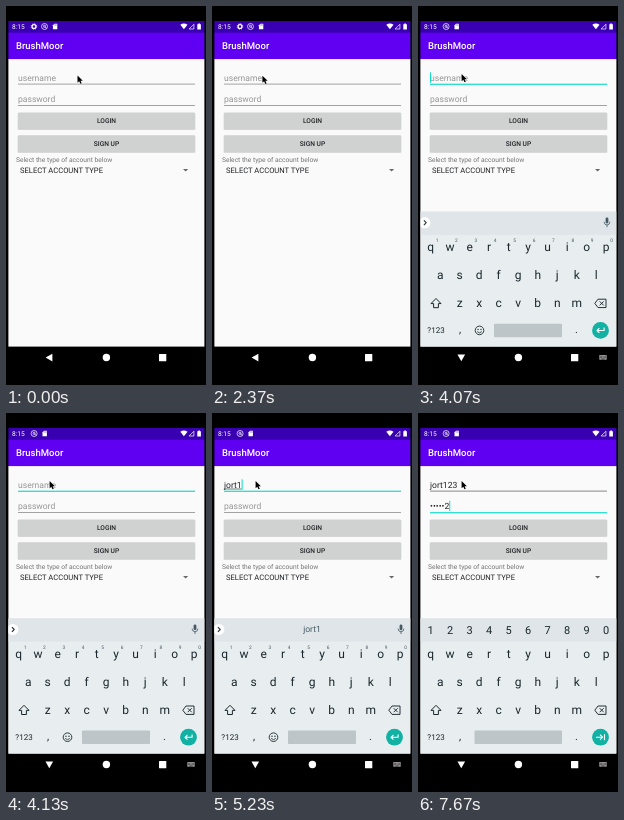
Recreate the animation shown at these times as an HTML page. Size 200 by 379 pixels, loop 8000 ms.

```html
<!DOCTYPE html>
<html lang="en">
<head>
<meta charset="utf-8">
<title>Login form</title>
<style>
  html, body { margin: 0; width: 100%; height: 100%; overflow: hidden; background: #000; }
  svg { display: block; width: 100vw; height: 100vh; }
  text { font-family: Roboto, "Noto Sans", sans-serif; text-rendering: geometricPrecision; white-space: pre; }
</style>
</head>
<body>
<svg id="stage" viewBox="0 0 200 379"></svg>
<script>
const LOOP = 8000;
const USER = 'jort123';
const TEAL = '#03dac5';
const INK = '#202124';
const KEY = '#1b272d';
const stage = document.getElementById('stage');

function el(tag, attrs, parent = stage) {
  const node = document.createElementNS('http://www.w3.org/2000/svg', tag);
  for (const k in attrs) node.setAttribute(k, attrs[k]);
  parent.appendChild(node);
  return node;
}
const group = (parent, attrs = {}) => el('g', attrs, parent);
const rect = (x, y, width, height, fill, parent, more) =>
  el('rect', { x, y, width, height, fill, ...more }, parent);
const path = (d, fill, parent, more) => el('path', { d, fill, ...more }, parent);
const line = (d, stroke, width, parent) =>
  path(d, 'none', parent, { stroke, 'stroke-width': width, 'stroke-linejoin': 'round' });
const disc = (cx, cy, r, fill, parent, more) => el('circle', { cx, cy, r, fill, ...more }, parent);
function text(str, x, y, size, fill, parent, more) {
  const node = el('text', { x, y, 'font-size': size, fill, ...more }, parent);
  node.textContent = str;
  return node;
}
const mid = { 'text-anchor': 'middle' };
const show = (node, on) => node.setAttribute('display', on ? 'inline' : 'none');
const ease = p => 1 - (1 - p) ** 3;
const span = (t, a, b) => Math.min(1, Math.max(0, (t - a) / (b - a)));

// Screen and bars
rect(2.4, 53, 196, 287.6, '#fafafa');
rect(2.4, 15, 196, 12, '#3900b1');
rect(2.4, 26.7, 196, 26.4, '#6000f3');
text('BrushMoor', 10, 43.4, 9.5, '#fff', stage, { 'font-weight': 500 });
text('8:15', 6, 23, 6.6, '#fff');

// Status icons
const gear = group(stage, { transform: 'translate(28 20.5)' });
disc(0, 0, 1.9, 'none', gear, { stroke: '#fff', 'stroke-width': 1.3 });
disc(0, 0, 2.8, 'none', gear, { stroke: '#fff', 'stroke-width': .8, 'stroke-dasharray': '1.1 1.1' });
const tray = group(stage);
disc(38.5, 20.5, 3, 'none', tray, { stroke: '#fff', 'stroke-width': .7 });
disc(38.5, 20.3, 1.1, 'none', tray, { stroke: '#fff', 'stroke-width': .7 });
line('M38.6 20.4l2 2.1', '#fff', .7, tray);
path('M48.4 17.8h2.9v5.5h-4.4v-4z', '#fff', tray);
line('M48.6 18.4v1.2M49.5 18.4v1.2M50.4 18.4v1.2', '#3900b1', .4, tray);
path('M174.3 18.8q3.6-2.4 7.2 0l-3.6 4.5z', '#fff');
line('M187.9 18.2v4.8h-4.8z', '#fff', .7);
path('M191.3 18.3h1v-.8h1.6v.8h1v5.2h-3.6z', '#fff');

// Form
function field(hint, y) {
  return {
    hint: text(hint, 12, y, 8.57, '#969696'),
    value: text('', 12, y, 8.57, INK),
    compose: rect(12, y + 1.2, 0, .6, INK),
    rule: rect(12, y + 3.2, 177, .7, '#808080'),
    caret: rect(12, y - 8.2, .95, 10.4, TEAL)
  };
}
const user = field('username', 74.5);
const pass = field('password', 96);

function button(label, y) {
  rect(11.6, y + .5, 177.8, 17.2, '#000', stage, { rx: 1, opacity: .13 });
  rect(12, y, 177, 17, '#d0d2d2', stage, { rx: .9 });
  text(label, 100.5, y + 10.9, 6.66, INK, stage, { ...mid, 'font-weight': 500 });
}
button('LOGIN', 106.4);
button('SIGN UP', 129.3);
text('Select the type of account below', 10, 156.3, 6.66, '#757575');
text('SELECT ACCOUNT TYPE', 14, 167.1, 7.6, INK);
path('M177 163h5.2l-2.6 2.6z', '#666');

// Keyboard
const clip = el('clipPath', { id: 'screen' });
rect(2.4, 53, 196, 287.6, '#fff', clip);
const board = group(group(stage, { 'clip-path': 'url(#screen)' }));
rect(2.4, 205.4, 196, 136, '#e8edef', board);
rect(2.4, 205.4, 196, 23.2, '#dfe5e8', board);

function row(chars, x0, y, size, parent) {
  [...chars].forEach((c, i) => text(c, x0 + i * 19.5, y, size, KEY, parent, mid));
}
row('qwertyuiop', 12.6, 244.8, 12, board);
row('asdfghjkl', 22.2, 272.8, 12, board);
row('zxcvbnm', 41.7, 300.6, 12, board);
line('M18 292.3l5 5.1h-2.6v4.1h-4.8v-4.1H13z', KEY, 1, board);
line('M180 293h8v8.4h-8l-3.2-4.2zM181.7 295.2l4 4M185.7 295.2l-4 4', KEY, .95, board);
text('?123', 18, 327, 8, KEY, board, mid);
text(',', 42, 327, 11, KEY, board, mid);
text('.', 158.5, 327, 11, KEY, board, mid);
disc(182.5, 324.2, 8.4, '#11b1a4', board);

// Extra keys for plain words and for passwords
const words = group(board);
const secret = group(board);
function spaceBar(x, parent) {
  rect(x, 317.6, 144 - x, 13.4, '#bec5c9', parent, { rx: 1 });
}
spaceBar(76, words);
spaceBar(56.5, secret);
disc(61.5, 324.2, 4.3, 'none', words, { stroke: KEY, 'stroke-width': .9 });
disc(60, 323.2, .7, KEY, words);
disc(63, 323.2, .7, KEY, words);
line('M59.2 325.4q2.3 2.6 4.6 0', KEY, .8, words);
line('M186.1 321.4v2.9h-7M181.4 322l-2.4 2.3 2.4 2.3', '#fff', 1.1, words);
line('M178 324.2h6.3M182 321.6l2.6 2.6-2.6 2.6M186.5 321.2v6', '#fff', 1.1, secret);
[...'1234567890'].forEach((c, i) => text(c, 19 + i * 19.4, 236, 4.8, '#455a64', words, mid));
row('1234567890', 12.6, 221, 11, secret);

disc(6.8, 216.5, 5.6, '#fff', words);
line('M5.9 214.1l2.3 2.4-2.3 2.4', '#263238', 1.1, words);
rect(187.6, 211.4, 2.8, 5.8, '#455a64', words, { rx: 1.4 });
line('M186.1 215.6q.2 3.2 2.9 3.2t2.9-3.2M189 218.8v2.2', '#455a64', .8, words);
const hintWord = text('', 100, 219, 8.6, '#455a64', words, mid);

// Navigation bar
const back = path('M-3.7 0l6.8-3.8v7.6z', '#fff');
disc(100.4, 351.5, 3.7, '#fff');
rect(153, 347.9, 7.3, 7.3, '#fff', stage, { rx: .5 });
const ime = group(stage);
rect(181.3, 349, 7.4, 4.8, '#9a9a9a', ime, { rx: .6 });
path('M182 350.3h6M182 351.6h6', 'none', ime,
  { stroke: '#000', 'stroke-width': .6, 'stroke-dasharray': '.7 .6' });
line('M183.4 353h3.2', '#000', .6, ime);

// Pointer
const pointer = group(stage);
const edge = { stroke: '#fff', 'stroke-width': .5, 'paint-order': 'stroke' };
const arrow = path('M0 0v7.2l1.7-1.5 1.2 2.6 1.3-.6-1.2-2.5h2.3z', '#000', pointer, edge);
const sizer = path('M-3.3-3.3h3.7l-1.2 1.2 2.9 2.9 1.2-1.2v3.7h-3.7l1.2-1.2-2.9-2.9-1.2 1.2z',
  '#000', pointer, edge);

// Time, x, y
const route = [[30, 71.5, 69.5], [430, 66, 71], [1000, 66, 71], [1300, 64, 70],
  [1900, 64, 70], [2250, 54, 70.5], [2600, 43.6, 68]];
const userKeys = [4430, 4630, 4800, 4970, 5170, 5400, 5570];
const passKeys = [6180, 6570, 6730, 6900, 7230, 7600];
const FOCUS = 2630, TAB = 5850;

function place(t) {
  const next = route.findIndex(stop => t < stop[0]);
  if (next < 0) return route[route.length - 1].slice(1);
  if (next === 0) return route[0].slice(1);
  const [a, x, y] = route[next - 1], [b, u, v] = route[next];
  const p = span(t, a, b);
  return [x + (u - x) * p, y + (v - y) * p];
}

function update(f, str, focused, since, t, composing) {
  show(f.hint, !str);
  if (f.value.textContent !== str) f.value.textContent = str;
  const w = str ? f.value.getComputedTextLength() : 0;
  f.compose.setAttribute('width', composing ? w : 0);
  f.caret.setAttribute('x', 12 + w);
  show(f.caret, focused && Math.floor((t - since) / 500) % 2 === 0);
  f.rule.setAttribute('fill', focused ? TEAL : str ? '#606060' : '#858585');
  f.rule.setAttribute('height', focused ? 1.1 : .75);
}

function draw(t) {
  const typed = keys => keys.filter(k => k <= t);
  const a = typed(userKeys), b = typed(passKeys);
  const name = USER.slice(0, a.length);
  const masked = b.length ? '•'.repeat(b.length - 1) + USER[b.length - 1] : '';
  const inUser = t >= FOCUS && t < TAB, inPass = t >= TAB;
  update(user, name, inUser, a.length ? a[a.length - 1] : FOCUS, t, inUser);
  update(pass, masked, inPass, b.length ? b[b.length - 1] : TAB, t, false);
  hintWord.textContent = name;

  const rise = ease(span(t, 3870, 4110));
  show(board, rise > 0);
  board.setAttribute('transform', `translate(0 ${(1 - rise) * 45})`);
  board.setAttribute('opacity', rise);
  show(words, !inPass);
  show(secret, inPass);

  const turn = ease(span(t, 2830, 3130));
  back.setAttribute('transform', `translate(43.3 351.6) rotate(${-90 * turn})`);
  ime.setAttribute('opacity', turn);
  show(gear, t < 4000);
  tray.setAttribute('transform', `translate(${t < 4000 ? 0 : -10.4} 0)`);

  const resizing = t >= 1230 && t < 2000;
  show(arrow, !resizing);
  show(sizer, resizing);
  pointer.setAttribute('transform', `translate(${place(t)})`);
}

function tick() {
  draw(performance.now() % LOOP);
  requestAnimationFrame(tick);
}
tick();
</script>
</body>
</html>
```
